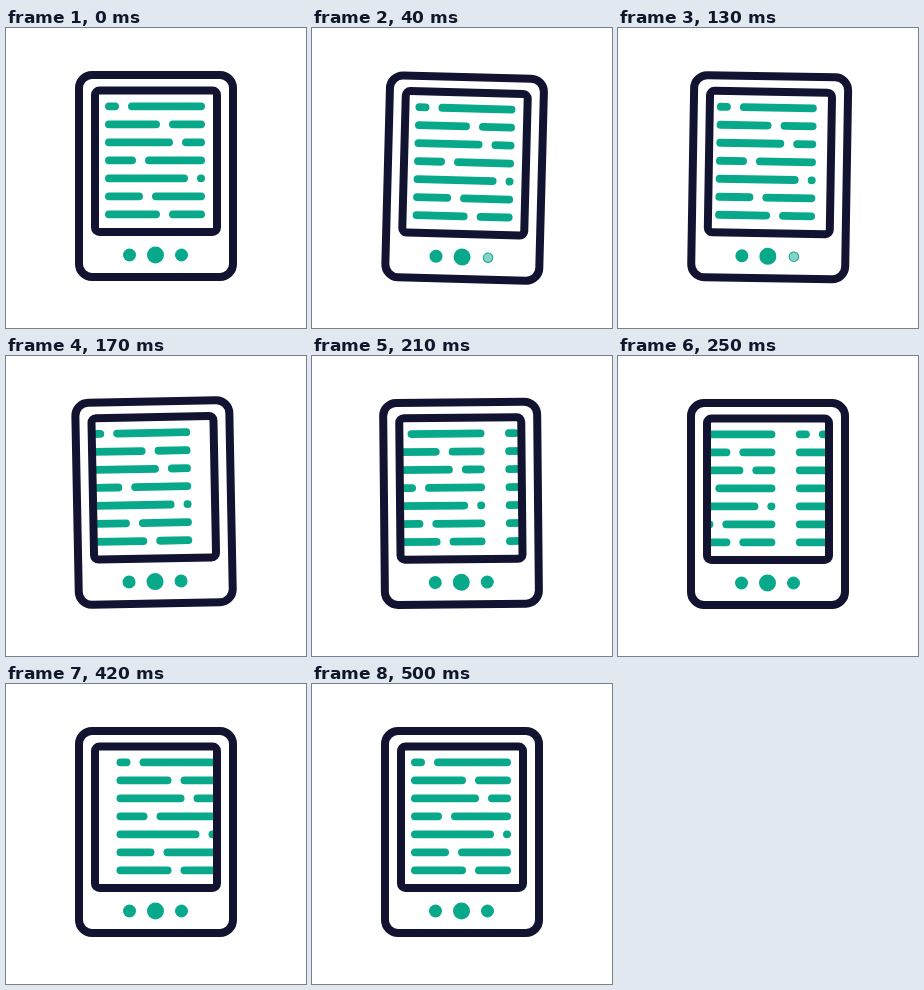
An HTML page with a canvas that plays this animation: 300x300 px, repeating every 0.54 s.

```html
<!DOCTYPE html>
<html lang="en">
<head>
<meta charset="utf-8">
<title>E-reader page turn</title>
<style>
  html, body { margin: 0; width: 100%; height: 100%; overflow: hidden; background: #fff; }
  canvas { display: block; width: 300px; height: 300px; }
</style>
</head>
<body>
<canvas id="stage"></canvas>
<script>
const SIZE = 300, LOOP = 540, FPS = 24, STEPS = 12;
const NAVY = '#121331', GREEN = [8, 168, 138], WHITE = [255, 255, 255];
const PIVOT = { x: 73, y: 249 };
const PAGE = { left: 99, right: 199, top: 78, leading: 18, pitch: 120.5 };
// Each text row is two bars separated by a gap; values are the first bar's end.
const BREAKS = [113, 154, 167, 130, 182, 137, 154];
const GAP = 9;

const canvas = document.getElementById('stage');
const ctx = canvas.getContext('2d');
const scale = window.devicePixelRatio || 1;
canvas.width = canvas.height = SIZE * scale;

const clamp = v => Math.min(1, Math.max(0, v));
const ease = (from, to, v) => (1 - Math.cos(Math.PI * clamp((v - from) / (to - from)))) / 2;
const mix = (a, b, k) => a + (b - a) * k;
const rgb = c => `rgb(${c.map(Math.round).join(',')})`;

// Steps run at 24 fps with their start times rounded to 10 ms.
function stepAt(ms) {
  let step = STEPS;
  while (step > 0 && Math.round(step * 100 / FPS) * 10 > ms) step--;
  return step;
}

function tiltAt(step) {
  if (step <= 2) return 3 * ease(0, 2, step);
  if (step <= 4) return mix(3, -1.1, ease(2, 4, step));
  return mix(-1.1, 0, ease(4, 6, step));
}

function frame(x, y, w, h, radius) {
  ctx.beginPath();
  ctx.roundRect(x, y, w, h, radius);
  ctx.strokeStyle = NAVY;
  ctx.lineWidth = 8;
  ctx.stroke();
}

function dot(x, y, radius) {
  ctx.beginPath();
  ctx.arc(x, y, radius, 0, Math.PI * 2);
  ctx.fill();
}

function bar(from, to, y) {
  ctx.beginPath();
  ctx.roundRect(from, y - 3.9, to - from, 7.8, 3.9);
  ctx.fill();
}

function page(shift) {
  BREAKS.forEach((end, row) => {
    const y = PAGE.top + row * PAGE.leading + 0.3;
    bar(PAGE.left + shift, end + shift, y);
    bar(end + GAP + shift, PAGE.right + shift, y);
  });
}

function buttons(press) {
  ctx.fillStyle = rgb(GREEN);
  dot(123.5, 227, 6.5);
  dot(149.5, 227, 8.5);
  ctx.fillStyle = rgb(GREEN.map((c, i) => mix(c, WHITE[i], press)));
  ctx.strokeStyle = rgb(GREEN);
  ctx.lineWidth = 1;
  dot(175.5, 227, mix(6, 3.5, press));
  ctx.stroke();
}

function draw(ms) {
  const step = stepAt(ms);
  const press = step < 2 ? ease(0, 2, step) : 1 - ease(2, 4, step);
  const shift = -PAGE.pitch * ease(2, 12, step);

  ctx.setTransform(scale, 0, 0, scale, 0, 0);
  ctx.fillStyle = '#fff';
  ctx.fillRect(0, 0, SIZE, SIZE);
  ctx.translate(PIVOT.x, PIVOT.y);
  ctx.rotate(tiltAt(step) * Math.PI / 180);
  ctx.translate(-PIVOT.x, -PIVOT.y);

  ctx.save();
  ctx.beginPath();
  ctx.rect(89, 63, 122, 141);
  ctx.clip();
  ctx.fillStyle = rgb(GREEN);
  page(shift);
  page(shift + PAGE.pitch);
  ctx.restore();

  frame(73, 47, 154, 202, 13);
  frame(89, 62.5, 122, 141.5, 4.5);
  buttons(press);
}

const start = performance.now();
function tick() {
  draw((performance.now() - start) % LOOP);
  requestAnimationFrame(tick);
}
tick();
</script>
</body>
</html>
```
